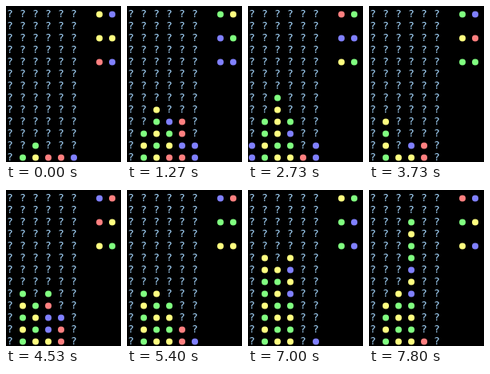
These frames come from a looping animation (144 px wide and 196 px high, 8 s). An HTML page:

```html
<!DOCTYPE html>
<html lang="en">
<head>
<meta charset="utf-8">
<title>Falling pairs</title>
<style>
  html, body { margin: 0; width: 100%; height: 100%; overflow: hidden; background: #000; }
  svg { display: block; width: 100vw; height: 100vh; }
  text { font: 13px "DejaVu Sans Mono", monospace; text-anchor: middle; fill: #a6d8ff; }
</style>
</head>
<body>
<svg id="stage" viewBox="0 0 144 196"></svg>
<script>
const COLS = 6, ROWS = 13, PREVIEW = 3, LOOP = 8000;
const COLORS = { R: '#ff8080', G: '#80ff80', Y: '#ffff80', B: '#8080ff' };

// Two colours, then the column each one drops into.
const MOVES = `
  YB34 YY12 RB45 GG12 GY32 BR34 GY12 BG01 BB55 BG01 BB55 RG43 GG12
  RG43 BB55 YG12 GB10 YB10 GB23 YR23 GG12 GB34 BR44 RY43 YG23 RB45
  BR34 GG12 YY12 YB33 GG22 GY11 GG33 YR34 YG22 GB34 GB34 YB34 GR34
  RB34 GY12 YB23`.trim().split(/\s+/);
const STATES = MOVES.length - PREVIEW + 1;

// Connected cells of one colour; columns are stacked from the floor up.
function findGroup(board, col, row) {
  const color = board[col][row], seen = new Set(), open = [[col, row]];
  while (open.length) {
    const [c, r] = open.pop(), key = c * ROWS + r;
    if (seen.has(key) || !board[c] || board[c][r] !== color) continue;
    seen.add(key);
    open.push([c + 1, r], [c - 1, r], [c, r + 1], [c, r - 1]);
  }
  return seen;
}

function settle(board) {
  for (;;) {
    const next = board.map((stack, c) =>
      stack.filter((_, r) => findGroup(board, c, r).size < 4));
    if (next.every((stack, c) => stack.length === board[c].length)) return board;
    board = next;
  }
}

function play(board, [a, b, colA, colB]) {
  const next = board.map(stack => [...stack]);
  next[colA].push(a);
  next[colB].push(b);
  return settle(next);
}

const boards = [['', 'G', 'YG', 'R', 'R', 'B'].map(s => [...s])];
for (let i = 1; i < STATES; i++) boards.push(play(boards[i - 1], MOVES[i - 1]));

// Steps last about 200 ms, snapped to a 15 Hz clock that drifts slightly.
function startTime(i) {
  if (i === 0) return 0;
  const drift = i < 33 ? 1 + Math.floor(i / 13) : 3 - Math.floor((i - 33) / 2);
  return Math.round((3 * i + drift) * 20 / 3) * 10;
}
const starts = boards.map((_, i) => startTime(i));

const stage = document.getElementById('stage');
function add(tag, attrs) {
  const el = document.createElementNS('http://www.w3.org/2000/svg', tag);
  for (const name in attrs) el.setAttribute(name, attrs[name]);
  return stage.appendChild(el);
}

function makeCell(col, line, mark) {
  const x = 5 + col * 16, y = 10.5 + line * 15;
  const dot = add('circle', { cx: x, cy: y, r: 4 });
  const text = add('text', { x, y: y + 3.5 });
  text.textContent = mark;
  return color => {
    dot.setAttribute('fill', color ? COLORS[color] : 'none');
    text.style.display = color ? 'none' : '';
  };
}

const cells = Array.from({ length: COLS }, (_, c) =>
  Array.from({ length: ROWS }, (_, r) => makeCell(c, ROWS - 1 - r, '?')));
const previews = Array.from({ length: PREVIEW }, (_, i) =>
  [makeCell(7, i * 2, ''), makeCell(8, i * 2, '')]);

let shown = -1;
function render(time) {
  let i = STATES - 1;
  while (starts[i] > time) i--;
  if (i === shown) return;
  shown = i;
  cells.forEach((column, c) => column.forEach((paint, r) => paint(boards[i][c][r])));
  previews.forEach((pair, n) => pair.forEach((paint, k) => paint(MOVES[i + n][k])));
}

const began = performance.now();
function tick() {
  render((performance.now() - began) % LOOP);
  requestAnimationFrame(tick);
}
tick();
</script>
</body>
</html>
```
